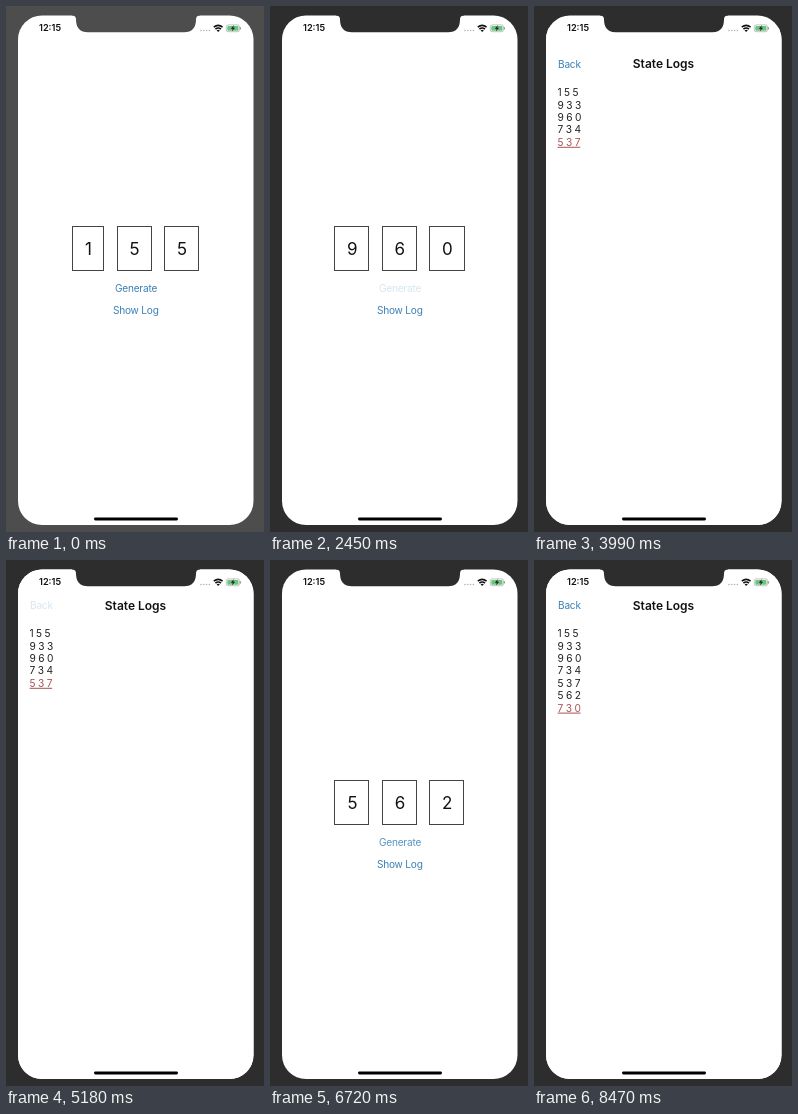
Animation, 258 px wide and 526 px high, one loop 8.54 s. Source, as an HTML page:

```html
<!DOCTYPE html>
<html lang="en">
<head>
<meta charset="utf-8">
<title>State Logs</title>
<style>
  html, body { margin: 0; width: 100%; height: 100%; overflow: hidden; background: #2d2d2d; }
  svg { display: block; width: 100vw; height: 100vh; }
  text { font-family: Inter, Roboto, sans-serif; fill: #111; }
  .middle { text-anchor: middle; }
  .button { font-size: 10.1px; letter-spacing: -.2px; fill: #3a80b7; }
  .digit { font-size: 17px; text-anchor: middle; }
  .title { font-size: 12px; font-weight: 600; }
  .line { font-size: 10.2px; letter-spacing: -.25px; fill: #222; }
  .last { fill: #a95656; text-decoration: underline; }
  .time { font-size: 9.2px; font-weight: 600; }
  .box { fill: none; stroke: #444; stroke-width: 1; }
</style>
</head>
<body>
<svg viewBox="0 0 258 526">
  <defs>
    <clipPath id="screen"><rect x="12" y="9.5" width="235.5" height="509.5" rx="24"/></clipPath>
  </defs>
  <rect id="bezel" width="258" height="526"/>
  <g clip-path="url(#screen)">
    <rect width="258" height="526" fill="#fff"/>
    <g id="boxes"></g>
    <text id="generate" class="button middle" x="130" y="286.4">Generate</text>
    <text id="showLog" class="button middle" x="129.8" y="307.6">Show Log</text>
    <g id="sheet">
      <rect y="9" width="258" height="517" fill="#fff"/>
      <text id="back" class="button" x="24" y="48.8">Back</text>
      <text class="title middle" x="129.5" y="49.5">State Logs</text>
      <g id="lines"></g>
    </g>
    <text class="time" x="33" y="25.4">12:15</text>
    <g fill="#b0b0b0">
      <circle cx="195" cy="24.5" r=".8"/><circle cx="197.8" cy="24.5" r=".8"/>
      <circle cx="200.6" cy="24.5" r=".8"/><circle cx="203.4" cy="24.5" r=".8"/>
    </g>
    <g fill="none" stroke="#111" stroke-width="1.6">
      <path d="M207.8 21.2Q212.2 17.4 216.6 21.2"/>
      <path d="M209.4 23.2Q212.2 20.8 215 23.2"/>
    </g>
    <path d="M210.6 24.3Q212.2 23 213.8 24.3L212.2 26Z" fill="#111"/>
    <rect x="220.3" y="18.9" width="13.2" height="6.8" rx="1.8" fill="#fff" stroke="#aaa" stroke-width=".7"/>
    <rect x="221.3" y="19.9" width="11.2" height="4.8" rx="1" fill="#69c67c"/>
    <path d="M234.5 21.2V23.5" stroke="#999" stroke-width="1"/>
    <path d="M227.9 19L224.8 22.8H226.7L226 25.6L229.1 21.7H227.2Z" fill="#222"/>
    <rect x="88" y="511.6" width="84" height="2.8" rx="1.4" fill="#000"/>
  </g>
  <path id="notch" d="M66 8V9.5Q70 9.5 70 13.5Q70 26.3 82 26.3H178Q190 26.3 190 13.5Q190 9.5 194 9.5V8Z"/>
</svg>
<script>
const LOOP = 8540, STEP = 70, TRAVEL = 510, DIM = 0.2;
const digitWidth = { 0: 34.4, 1: 31.7, 2: 33.8, 3: 34.1, 4: 34.4, 5: 34, 6: 34.3, 7: 33.3, 8: 34.3, 9: 34.3 };
const GAP = 13.3, CENTER = 129.8;

// Each tap is [press, release]; a Generate release also yields a new state.
const generateTaps = [
  [1750, 1820, '933'], [2100, 2170, '960'], [2450, 2590, '734'],
  [2940, 3010, '537'], [6510, 6580, '562'], [6930, 7000, '730']
];
const logTaps = [[3500, 3700], [7490, 7620]];
const backTaps = [[5180, 5250]];
const sheetMoves = [[3686, 'up'], [5280, 'down'], [7592, 'up']];

const $ = id => document.getElementById(id);

function tapOpacity(taps, t) {
  const tap = taps.filter(([press]) => press <= t).pop();
  if (!tap) return 1;
  if (t < tap[1]) return DIM;
  const p = Math.min(1, (t - tap[1] + 40) / 250);
  return DIM + (1 - DIM) * p * p * (3 - 2 * p);
}

// Critically damped spring, from 1 down to 0.
function spring(ms) {
  const x = Math.sqrt(1000 / 3) * ms / 1000;
  return (1 + x) * Math.exp(-x);
}

function sheetOffset(t) {
  const move = sheetMoves.filter(([start]) => start <= t).pop();
  if (!move) return TRAVEL;
  const rest = spring(t - move[0]);
  return TRAVEL * (move[1] === 'up' ? rest : 1 - rest);
}

function boxesMarkup(state) {
  const widths = [...state].map(d => digitWidth[d]);
  let x = CENTER - (widths.reduce((a, b) => a + b) + 2 * GAP) / 2;
  return [...state].map((digit, i) => {
    const left = Math.round(x) - 0.5, right = Math.round(x + widths[i]) - 0.5;
    const mid = x + widths[i] / 2;
    x += widths[i] + GAP;
    return `<rect class="box" x="${left}" y="220.5" width="${right - left}" height="44"/>` +
      `<text class="digit" x="${mid}" y="249.2">${digit}</text>`;
  }).join('');
}

function linesMarkup(states) {
  return states.map((state, i) => {
    const style = i === states.length - 1 ? 'line last' : 'line';
    return `<text class="${style}" x="23.6" y="${77.2 + i * 12.4}">${[...state].join(' ')}</text>`;
  }).join('');
}

let shownCount = 0;
function render(t) {
  const states = ['155', ...generateTaps.filter(tap => tap[1] <= t).map(tap => tap[2])];
  if (states.length !== shownCount) {
    shownCount = states.length;
    $('boxes').innerHTML = boxesMarkup(states[shownCount - 1]);
    $('lines').innerHTML = linesMarkup(states);
  }
  const shade = t < 350 ? '#4d4d4d' : t < 420 ? '#343434' : '#2d2d2d';
  $('bezel').setAttribute('fill', shade);
  $('notch').setAttribute('fill', shade);
  $('generate').setAttribute('opacity', tapOpacity(generateTaps, t));
  $('showLog').setAttribute('opacity', tapOpacity(logTaps, t));
  $('back').setAttribute('opacity', tapOpacity(backTaps, t));
  $('sheet').setAttribute('transform', `translate(0 ${sheetOffset(t).toFixed(2)})`);
}

const start = performance.now();
function tick() {
  const t = (performance.now() - start) % LOOP;
  render(Math.floor(t / STEP) * STEP);
  requestAnimationFrame(tick);
}
tick();
</script>
</body>
</html>
```
